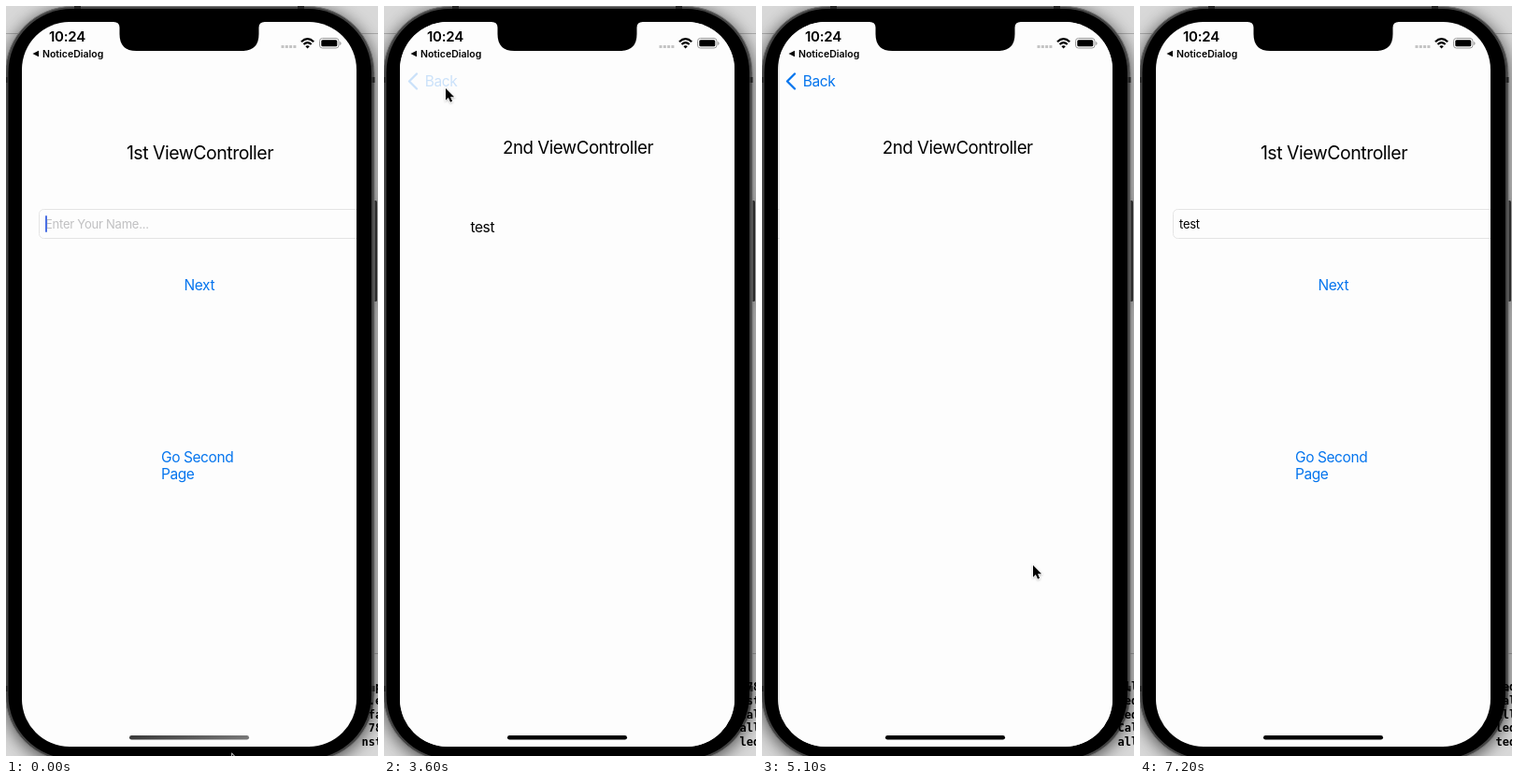
An HTML page that plays this animation: 398 by 802 pixels, repeating every 7500 ms.

```html
<!DOCTYPE html>
<html lang="en">
<head>
<meta charset="utf-8">
<title>Passing a name between pages</title>
<style>
  html, body { margin: 0; width: 100%; height: 100%; overflow: hidden; background: #d8d8d8; }
  svg { display: block; width: 398px; height: 802px; }
  text { font-family: Inter, "Open Sans", sans-serif; font-size: 15.5px; letter-spacing: -.027em; white-space: pre; }
  .blue { fill: #0575ee; }
  .title { text-anchor: middle; letter-spacing: -.025em; }
  .field { font-size: 13px; letter-spacing: -.018em; }
  .log { font: bold 12px "DejaVu Sans Mono", monospace; letter-spacing: 0; }
  .phone { filter: drop-shadow(0 3px 9px rgba(0, 0, 0, .65)); }
</style>
</head>
<body>
<svg viewBox="0 0 398 802">
  <defs>
    <clipPath id="glass"><rect x="17" y="17" width="358" height="775" rx="51"/></clipPath>
    <linearGradient id="shimmer">
      <stop offset="0" stop-color="#3a3a3a"/>
      <stop offset="1" stop-color="#777"/>
    </linearGradient>
  </defs>

  <rect width="398" height="802" fill="#d8d8d8"/>
  <path d="M0 29.5H398M380 692.5H398" stroke="#aaa"/>

  <g class="phone">
    <rect x="392" y="208" width="5" height="108" rx="1.5" fill="#2b2b2b"/>
    <rect x="-.5" y=".5" width="394.5" height="807" rx="71" fill="#444" stroke="#777"/>
    <path d="M73 1.5H80M312 1.5H319M0 76V82M393 76V82M0 727V733M393 727V733" stroke="#222" stroke-width="3"/>
  </g>
  <g id="log"></g>
  <rect x="2.5" y="3" width="388.5" height="802" rx="68"/>

  <g clip-path="url(#glass)">
    <rect x="17" y="17" width="358" height="775" fill="#fdfdfd"/>
    <g id="first">
      <text class="title" x="207.5" y="163.5" style="font-size:19.5px">1st ViewController</text>
      <rect x="35.5" y="217.5" width="370" height="31" rx="5" fill="none" stroke="#e4e4e4"/>
      <text id="hint" class="field" x="42" y="237.5" fill="#c0c0c2">Enter Your Name...</text>
      <text id="typed" class="field" x="42" y="237.5"></text>
      <rect id="caret" y="224" width="2" height="18" rx="1" fill="#4a6fe3"/>
      <text id="next" class="blue" x="190.5" y="303.5">Next</text>
      <g id="go" class="blue">
        <text x="166" y="488">Go Second</text>
        <text x="166" y="506">Page</text>
      </g>
      <rect id="shade" x="17" y="17" width="466" height="775"/>
    </g>
    <g id="second">
      <rect x="17" y="17" width="358" height="775" fill="#fdfdfd"/>
      <text class="title" x="207.5" y="158" style="font-size:18.7px">2nd ViewController</text>
      <text id="passed" x="92.5" y="241.5">test</text>
    </g>
    <g id="back">
      <path d="M35 72.5L27 80.5L35 88.5" fill="none" stroke="#0575ee" stroke-width="2.3" stroke-linecap="round" stroke-linejoin="round"/>
      <text class="blue" x="43.7" y="86">Back</text>
    </g>

    <text x="46" y="38" style="font-size:15px;font-weight:600;letter-spacing:-.015em">10:24</text>
    <path d="M28.5 51L35 47.7V54.3Z"/>
    <text x="39" y="54.8" style="font-size:10.5px;font-weight:600;letter-spacing:0">NoticeDialog</text>
    <path d="M294.5 43.5H311" stroke="#c4c4c4" stroke-width="3" stroke-dasharray="3 1.3"/>
    <path d="M316 38.2Q322.6 32 329.2 38.2M318.5 41Q322.6 37.2 326.7 41" fill="none" stroke="#000" stroke-width="2.2"/>
    <path d="M320.3 43.1Q322.6 41.3 324.9 43.1L322.6 45.5Z"/>
    <rect x="335.5" y="34.5" width="20.5" height="10.5" rx="3" fill="none" stroke="#999"/>
    <rect x="337.3" y="36.2" width="17" height="7" rx="1.5"/>
    <path d="M357.2 38V42Q358.6 41.3 358.6 40T357.2 38" fill="#999"/>
    <rect id="home" x="132" y="780" width="128" height="4.6" rx="2.3"/>
  </g>
  <path d="M115 16V17Q121.5 17 121.5 23V30Q121.5 48 139.5 48H252.5Q270.5 48 270.5 30V23Q270.5 17 277 17V16Z"/>

  <g id="mouse">
    <path d="M0 0V15L3.4 11.9L5.9 17.4L8.3 16.3L5.9 11H10.7Z" transform="scale(.85)" stroke="#fff" stroke-width="1.6" paint-order="stroke" style="filter:drop-shadow(0 1px 1px rgba(0,0,0,.25))"/>
  </g>
</svg>

<script>
const LOOP = 7500, STEP = 100, WIDTH = 358, SETTLE = 500;
const el = Object.fromEntries([...document.querySelectorAll('svg [id]')].map(n => [n.id, n]));

// Transitions alternate between pushing and popping the second page
const [PUSH, POP, PUSH_AGAIN, POP_AGAIN] = [1800, 3600, 4600, 6600];
const moves = [PUSH, POP, PUSH_AGAIN, POP_AGAIN];

// Pointer stops: arrival time, travel time, x, y
const stops = [
  [0, 1, 242, 800],
  [1500, 800, 220, 288],
  [2400, 300, 133, 270],
  [2600, 200, 48, 80],
  [3100, 400, 210, 240],
  [POP - 100, 400, 66, 88],
  [PUSH_AGAIN, 800, 188, 493],
  [5100, 300, 290, 598],
  [5300, 200, 52, 80],
  [6100, 600, 44, 93],
  [7000, 400, 242, 815]
];

const clamp = v => Math.max(0, Math.min(1, v));
const smooth = u => u * u * (3 - 2 * u);
const shift = (node, x, y = 0) => node.setAttribute('transform', `translate(${x} ${y})`);
const fade = (node, v) => node.setAttribute('opacity', v);

// Critically damped spring, cut off once it is still
function spring(ms) {
  const x = ms * 7.5 / SETTLE;
  return x >= 9 ? 1 : 1 - (1 + x) * Math.exp(-x);
}

function pushAmount(t) {
  const done = moves.filter(s => s <= t).length;
  if (!done) return 0;
  const s = spring(t - moves[done - 1]);
  return done % 2 ? s : 1 - s;
}

function pointer(t) {
  return stops.reduce(([x, y], [at, travel, nx, ny]) => {
    const e = smooth(clamp((t - at + travel) / travel));
    return [x + (nx - x) * e, y + (ny - y) * e];
  }, stops[0].slice(2));
}

// A tapped button dims, then recovers as its page starts to move
const tapped = (t, start) => .2 + .8 * clamp(Math.abs(t - start + 150) / 200);
const backHeld = t => [POP, POP_AGAIN].some(s => t >= s - STEP && t < s + 2 * SETTLE);

// Every transition logs one line when it starts and one when it settles
const firstLines = ['  p', ' .e', ' fa', ' 78', 'nst'];
const callLines = ['Cal', 'all', 'led', 'ted'];
const logLine = i => firstLines[i] || callLines[(i - firstLines.length) % callLines.length];
const logCount = t => moves.filter(s => s <= t).length + moves.filter(s => s + SETTLE <= t).length;

const logRows = firstLines.map((_, i) => {
  const row = document.createElementNS('http://www.w3.org/2000/svg', 'text');
  row.setAttribute('class', 'log');
  row.setAttribute('x', 380.5);
  row.setAttribute('y', 732 + i * 14.8);
  return el.log.appendChild(row);
});

function render(t) {
  const p = pushAmount(t);
  shift(el.first, -.3 * WIDTH * p);
  shift(el.second, WIDTH * (1 - p));
  fade(el.second, p > 0 ? 1 : 0);
  fade(el.shade, .1 * p);
  fade(el.passed, t < PUSH_AGAIN ? 1 : 0);
  fade(el.back, p * (backHeld(t) && !(t >= PUSH_AGAIN && t < POP_AGAIN - STEP) ? .2 : 1));

  const count = Math.min(4, Math.floor(t / STEP));
  el.typed.textContent = 'test'.slice(0, count);
  fade(el.hint, count ? 0 : 1);
  el.caret.setAttribute('x', 42 + (count && el.typed.getComputedTextLength()));
  fade(el.caret, t <= PUSH && (t + 600) % 1000 < 600 || t < 900 ? 1 : 0);
  fade(el.next, tapped(t, PUSH));
  fade(el.go, tapped(t, PUSH_AGAIN));
  el.home.setAttribute('fill', t <= PUSH ? 'url(#shimmer)' : '#000');

  logRows.forEach((row, i) => { row.textContent = logLine(logCount(t) + i); });
  shift(el.mouse, ...pointer(t));
}

const start = performance.now();
function tick() {
  const t = (performance.now() - start) % LOOP;
  render(Math.floor(t / STEP) * STEP);
  requestAnimationFrame(tick);
}
tick();
</script>
</body>
</html>
```
